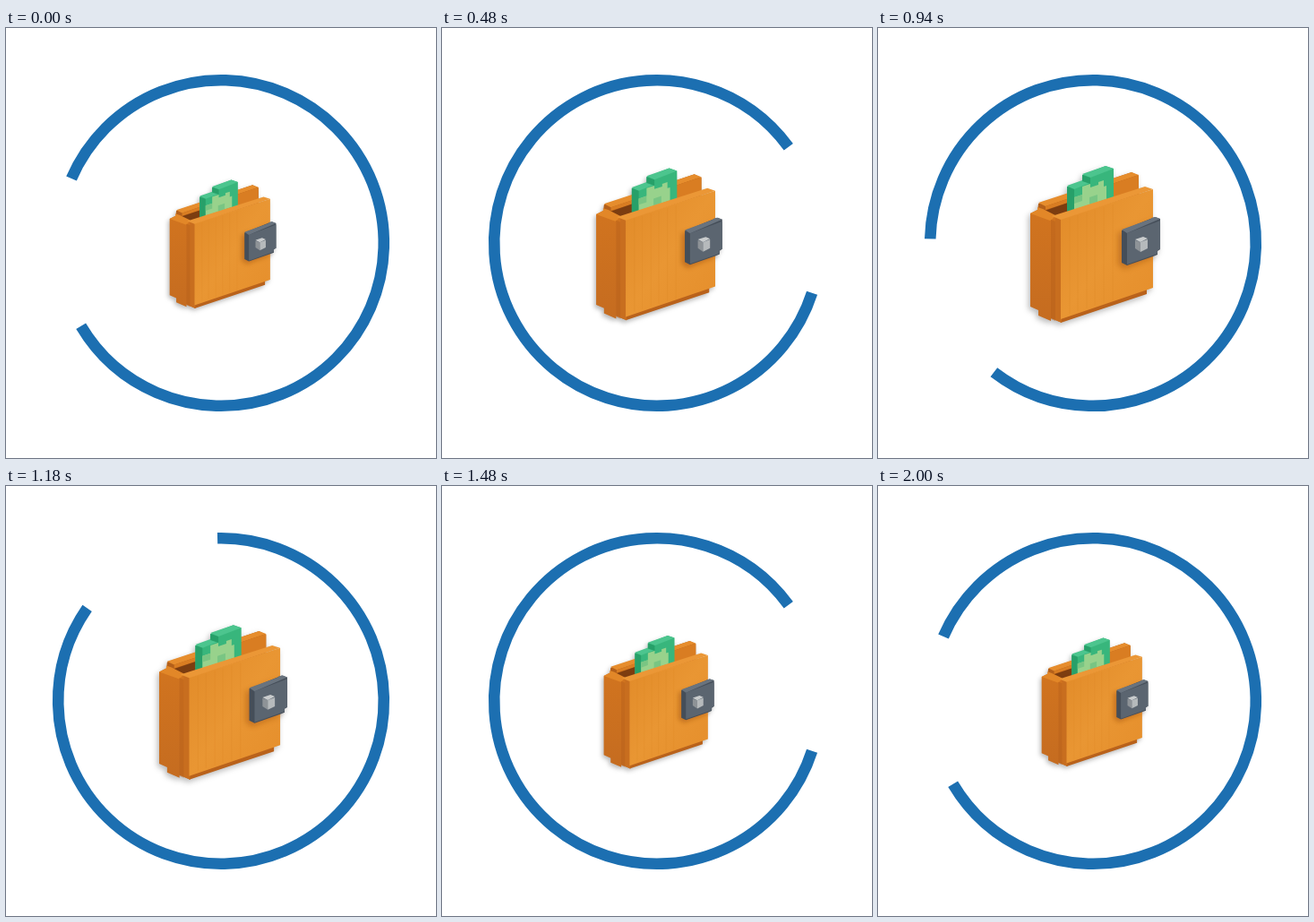
An HTML page for the animation above (2.03 s loop, 480 by 480 pixels).

```html
<!DOCTYPE html>
<html lang="en">
<head>
<meta charset="utf-8">
<title>Wallet loader</title>
<style>
  html, body { margin: 0; width: 100%; height: 100%; overflow: hidden; background: #fff; }
  svg { display: block; width: 100vw; height: 100vh; }
  #wallet { filter: drop-shadow(-2px 3px 3px rgba(0, 0, 0, .27)); }
</style>
</head>
<body>
<svg viewBox="0 0 480 480">
  <defs>
    <linearGradient id="front" x1="0" y1="0" x2="1" y2="1">
      <stop offset="0" stop-color="#e18a28"/>
      <stop offset=".5" stop-color="#e99633"/>
      <stop offset="1" stop-color="#e58e2b"/>
    </linearGradient>
    <linearGradient id="side" x1="0" y1="0" x2="0" y2="1">
      <stop offset="0" stop-color="#d1741f"/>
      <stop offset="1" stop-color="#c56c20"/>
    </linearGradient>
    <filter id="soft" x="-30%" y="-30%" width="160%" height="160%"><feGaussianBlur stdDeviation="3"/></filter>
  </defs>

  <circle id="ring" cx="240" cy="240" r="181.8" fill="none" stroke="#1c6fb1" stroke-width="12.6"
          pathLength="360" stroke-dasharray="306 54"/>

  <g id="wallet">
    <!-- back panel and pocket -->
    <path fill="#b4601a" d="M179 196 283 161 291 165V186L200 216 178 206Z"/>
    <path fill="#e68d2d" d="M179 195 283 161 291 164 187 199Z"/>
    <path fill="#d97d22" d="M187 199 291 164V181L262 190V179L187 203Z"/>
    <path fill="#7c3d10" d="M186 204 212 195V207L200 211Z"/>
    <!-- banknote -->
    <path fill="#38b67c" d="M211 177 228 171V164L254 154 263 157V190L211 207Z"/>
    <path fill="#4cc58e" d="M211 176 228 170 236 173 219 180ZM228 163 254 154 263 157 237 167Z"/>
    <path fill="#27a069" d="M211 177 219 180V204L211 207ZM228 164 237 167V174L228 171Z"/>
    <path fill="#98d28c" d="M228 177 237 174V178L246 175V172L252 170V177L255 176V191L219 203V189L228 186Z"/>
    <path fill="#79c583" d="M219 189 228 186V193L219 196ZM236 189 245 186V194L236 197Z"/>
    <!-- left side -->
    <path fill="url(#side)" d="M170 207 178 203 198 210 205 213V329L193 324V327L179 321V315L170 311Z"/>
    <path fill="#e28728" d="M170 207 178 203V200L184 202 198 209 195 213 192 215Z"/>
    <path fill="#b55f1a" d="M193 214 198 216V327L193 325Z" opacity=".45"/>
    <!-- front -->
    <path fill="#b9621b" d="M204 323 300 291V297L204 329Z"/>
    <path fill="#c86e1f" d="M198 210 205 213V329L198 326Z"/>
    <path fill="url(#front)" d="M204 213 307 180V290L204 325Z"/>
    <path fill="#eb9736" d="M194 210 298 177 307 180 204 214Z"/>
    <path stroke="#d98324" stroke-width=".7" opacity=".35" fill="none"
          d="M214 212V319M223 209V316M233 206V313M242 203V310M252 200V307M262 197V304"/>
    <!-- clasp -->
    <path fill="#9c4d0c" opacity=".45" filter="url(#soft)" d="M268 229 306 216V257L275 269 268 264Z"/>
    <path fill="#454e59" d="M272 226 309 211 315 213V247L312 249V253L307 255 278 265 272 262Z"/>
    <path fill="#5b6570" d="M278 229 315 215V247L312 248V252L278 264Z"/>
    <path fill="#69737e" d="M272 225 305 213V212L310 211 315 213 278 229Z"/>
    <path fill="#8e9397" d="M287 237 293 239V250L287 246Z"/>
    <path fill="#b6babc" d="M293 239 301 236V246L293 250Z"/>
    <path fill="#c9cccd" d="M287 236 296 233 301 235 293 239Z"/>
  </g>
</svg>
<script>
  const ring = document.getElementById('ring');
  const wallet = document.getElementById('wallet');
  const LOOP = 2030, FPS = 33, SMALL = 0.819;

  // cubic-bezier(.5, 0, 0, 1), solved by bisection
  function ease(x) {
    let lo = 0, hi = 1, s = 0.5;
    for (let i = 0; i < 24; i++) {
      s = (lo + hi) / 2;
      if (1.5 * s * (1 - s) ** 2 + s ** 3 < x) lo = s; else hi = s;
    }
    return s * s * (3 - 2 * s);
  }

  function draw(ms) {
    // steps at 33 per second, rounded to hundredths of a second
    const step = Math.floor((Math.floor(ms / 10) + 0.5) * FPS / 100);
    const t = step / FPS;
    const grow = t < 1 ? ease(t) : 1 - ease(t - 1);
    const scale = SMALL + (1 - SMALL) * grow;
    ring.setAttribute('transform', `rotate(${203.3 + 360 * t} 240 240)`);
    wallet.setAttribute('transform', `translate(240 240) scale(${scale}) translate(-240 -240)`);
  }

  const start = performance.now();
  function tick() {
    draw((performance.now() - start) % LOOP);
    requestAnimationFrame(tick);
  }
  tick();
</script>
</body>
</html>
```
